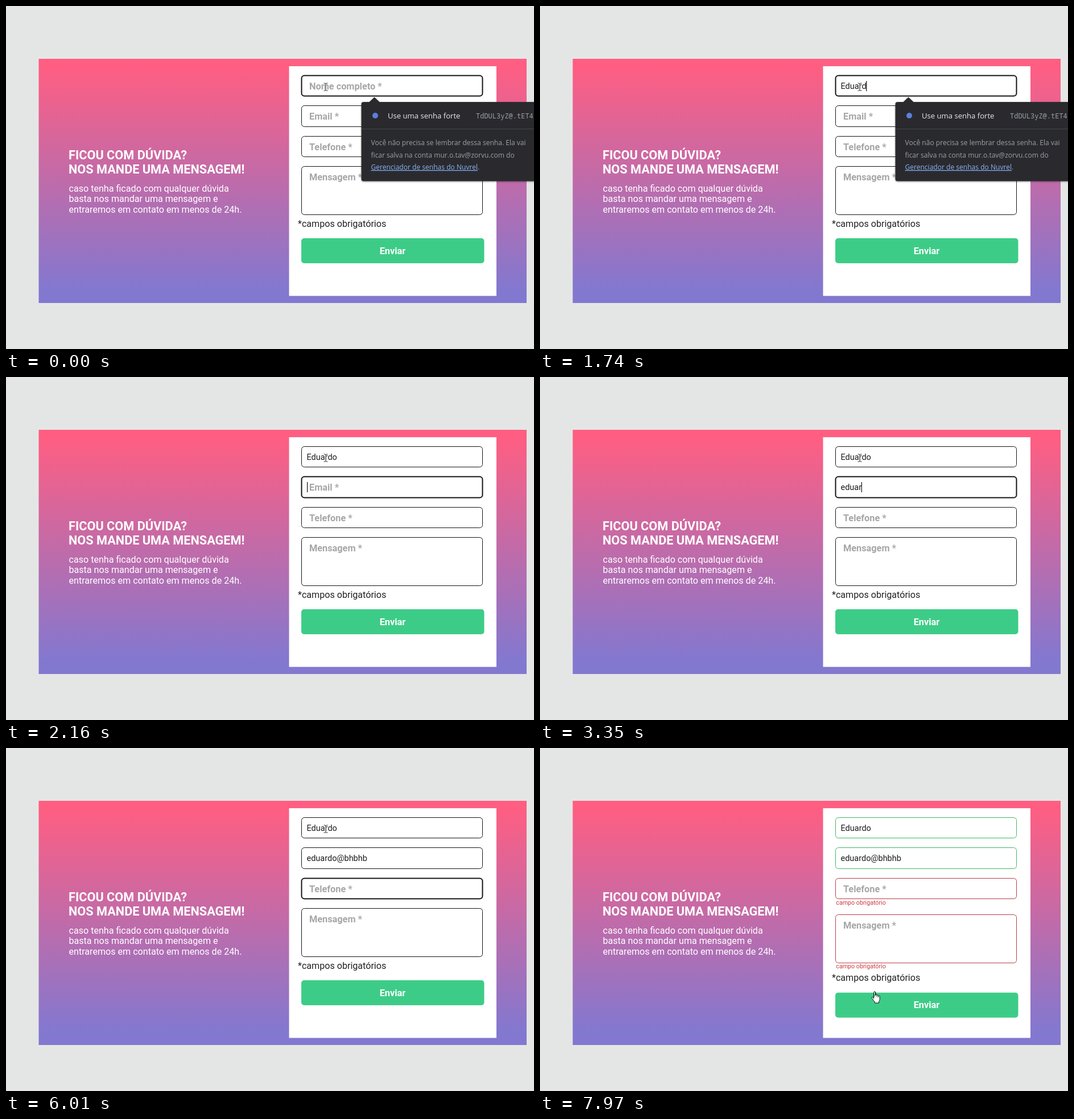
Recreate the animation shown at these times as an HTML page. Size 928 by 604 pixels, loop 8000 ms.

```html
<!DOCTYPE html>
<html lang="pt">
<head>
<meta charset="utf-8">
<style>
  html, body { margin: 0; width: 100%; height: 100%; overflow: hidden; background: #e4e6e5; }
  svg { display: block; font-family: Roboto, sans-serif; }
  text { white-space: pre; }
  .title { font-size: 21.7px; font-weight: 700; fill: #fff; }
  .lead { font-size: 16.1px; fill: #fff; }
  .note { font-size: 16.1px; fill: #212121; }
  .send { font-size: 16.35px; font-weight: 700; fill: #fff; }
  .label { font-size: 16.3px; font-weight: 700; fill: #a6a6a8; }
  .value { font-size: 14.5px; fill: #1c1c1e; }
  .error { font-size: 10.7px; fill: #c93a40; }
  #popup { font-family: "Open Sans", sans-serif; font-size: 12.05px; fill: #9aa0a6; }
</style>
</head>
<body>
<svg width="928" height="604" viewBox="0 0 928 604">
  <defs>
    <linearGradient id="sunset" x2="0" y2="1">
      <stop offset=".03" stop-color="#ff5e82"/>
      <stop offset=".95" stop-color="#8278d0"/>
    </linearGradient>
    <filter id="shadow"><feDropShadow dx="0" dy="1" stdDeviation="1.5" flood-opacity=".4"/></filter>
  </defs>
  <rect x="57.5" y="93" width="857.5" height="430" fill="url(#sunset)"/>
  <text class="title" x="110" y="269.5">FICOU COM DÚVIDA?</text>
  <text class="title" x="110" y="295">NOS MANDE UMA MENSAGEM!</text>
  <text class="lead" x="110.5" y="327">caso tenha ficado com qualquer dúvida</text>
  <text class="lead" x="110.5" y="345.3">basta nos mandar uma mensagem e</text>
  <text class="lead" x="110.5" y="363.7">entraremos em contato em menos de 24h.</text>

  <rect x="497.5" y="106" width="364.5" height="404.5" fill="#fff"/>
  <g id="fields"></g>
  <rect id="caret" width="1.2" height="18" fill="#111"/>
  <g id="footer">
    <text class="note" x="513" y="388.5">*campos obrigatórios</text>
    <rect x="519" y="409" width="321.5" height="44" rx="5" fill="#3dcc87"/>
    <text class="send" x="679.5" y="436.8" text-anchor="middle">Enviar</text>
  </g>
  <g id="errors">
    <text class="error" x="520.3" y="276">campo obrigatório</text>
    <text class="error" x="520.3" y="388.3">campo obrigatório</text>
  </g>

  <g id="popup">
    <path d="M940 169H656.5L647.5 160.5L638.5 169H628.5q-4 0-4 4V304.5q0 4 4 4H940Z" fill="#292b2e" filter="url(#shadow)"/>
    <path d="M625 216.5H928" stroke="#43464a"/>
    <circle cx="649" cy="193" r="5" fill="#5b7fe0"/>
    <text x="671" y="198" font-size="13.1" fill="#e8eaed">Use uma senha forte</text>
    <text x="826" y="197.5" font-size="12" font-family="Noto Sans Mono, monospace">TdDUL3yZ@.tET4</text>
    <text x="641.5" y="245">Você não precisa se lembrar dessa senha. Ela vai</text>
    <text x="641.5" y="266.5">ficar salva na conta mur.o.tav@zorvu.com do</text>
    <text x="641.5" y="288"><tspan fill="#8ab4f8" text-decoration="underline">Gerenciador de senhas do Nuvrel</tspan>.</text>
  </g>

  <g id="cursor">
    <g id="ibeam" fill="none">
      <path d="M-3.5-6.5H-1L0-5.5L1-6.5H3.5M0-5.5V5.5M-3.5 6.5H-1L0 5.5L1 6.5H3.5" stroke="#fff" stroke-width="2.2" opacity=".6"/>
      <path d="M-3.5-6.5H-1L0-5.5L1-6.5H3.5M0-5.5V5.5M-3.5 6.5H-1L0 5.5L1 6.5H3.5" stroke="#333"/>
    </g>
    <path id="arrow" d="M0 0V13.5L3.1 10.7L5.2 15.6L7.5 14.6L5.4 9.8H9.6Z" fill="#fff" stroke="#111"/>
    <path id="hand" d="M-1.5 12V1Q-1.5-.5 0-.5T1.5 1V6Q3-.2 0 0M1.5 6Q1.6 4.6 3 4.8T4.3 6.3Q4.6 5.2 5.8 5.5T7 7Q7.4 6.2 8.3 6.5T9.2 8V13Q9 15.5 7.5 17V19.5H.5V17.5Q-1.5 16-4.6 11Q-5.3 9.6-4.2 9T-1.5 11M4.3 6.3V9M7 7V9.5" fill="#fff" stroke="#111"/>
  </g>
</svg>
<script>
const LOOP = 8000, BLINK = 530, SUBMIT = 7690;
const $ = id => document.getElementById(id);
const show = (el, on) => el.setAttribute("visibility", on ? "visible" : "hidden");
const move = (el, x, y) => el.setAttribute("transform", `translate(${x} ${y})`);

// keys: time at which each character of the text is typed
const fields = [
  { label: "Nome completo *", top: 122.5, height: 36, focus: -600, blur: 2090,
    text: "Eduardo", keys: [700, 910, 1050, 1190, 1400, 1610, 1820] },
  { label: "Email *", top: 175.5, height: 37, focus: 2090, blur: 5030,
    text: "eduardo@bhbhb",
    keys: [2660, 2800, 2940, 3080, 3220, 3360, 3500, 4410, 4620, 4690, 4760, 4830, 4900] },
  { label: "Telefone *", top: 229.5, height: 36, focus: 5030, blur: SUBMIT, text: "", keys: [] },
  { label: "Mensagem *", top: 282.5, height: 85, focus: LOOP, blur: LOOP, text: "", keys: [] }
];

$("fields").innerHTML = fields.map(f => `<g>
  <rect x="519.5" y="${f.top}" width="318" height="${f.height}" rx="5" fill="#fff"/>
  <text class="label" x="533" y="${f.top + 24.5}">${f.label}</text>
  <text class="value" x="528.5" y="${f.top + 23}"></text></g>`).join("");
fields.forEach((f, i) => {
  f.group = $("fields").children[i];
  [f.box, f.labelText, f.valueText] = f.group.children;
});

// pointer path: [time, x, y]
const path = [[6500, 562, 142.5], [7180, 593, 456], [7340, 593, 456], [7600, 588, 429.5]];

function pointerAt(t) {
  const next = path.findIndex(p => t < p[0]);
  if (next === 0) return path[0].slice(1);
  if (next < 0) return path[path.length - 1].slice(1);
  const [t0, x0, y0] = path[next - 1], [t1, x1, y1] = path[next];
  const u = (t - t0) / (t1 - t0), k = u * u * (3 - 2 * u);
  return [x0 + (x1 - x0) * k, y0 + (y1 - y0) * k];
}

function drawField(f, t, sent) {
  const typed = f.keys.filter(k => k <= t).length;
  const focused = t >= f.focus && t < f.blur;
  f.valueText.textContent = f.text.slice(0, typed);
  show(f.labelText, !typed);
  f.box.setAttribute("stroke", !sent ? "#151515" : typed ? "#3cb963" : "#bd3d46");
  f.box.setAttribute("stroke-width", focused ? 2 : 1);
  if (!focused) return;
  const lastAction = typed ? f.keys[typed - 1] : f.focus;
  show($("caret"), Math.floor((t - lastAction) / BLINK) % 2 === 0);
  $("caret").setAttribute("x", typed ? 528 + f.valueText.getComputedTextLength() : 529);
  $("caret").setAttribute("y", f.top + 9.5);
}

function draw(now) {
  const t = now % LOOP, sent = t >= SUBMIT;
  show($("caret"), false);
  fields.forEach(f => drawField(f, t, sent));
  show($("popup"), t < fields[0].blur);
  show($("errors"), sent);
  move(fields[3].group, 0, sent ? 11 : 0);
  move($("footer"), 0, sent ? 21.7 : 0);

  const [x, y] = pointerAt(t);
  const overField = fields.some(f => y > f.top && y < f.top + f.height);
  const overButton = y > 409 && y < 453;
  move($("cursor"), x, y);
  show($("ibeam"), overField);
  show($("hand"), overButton);
  show($("arrow"), !overField && !overButton);
  requestAnimationFrame(draw);
}
draw(0);
</script>
</body>
</html>
```
